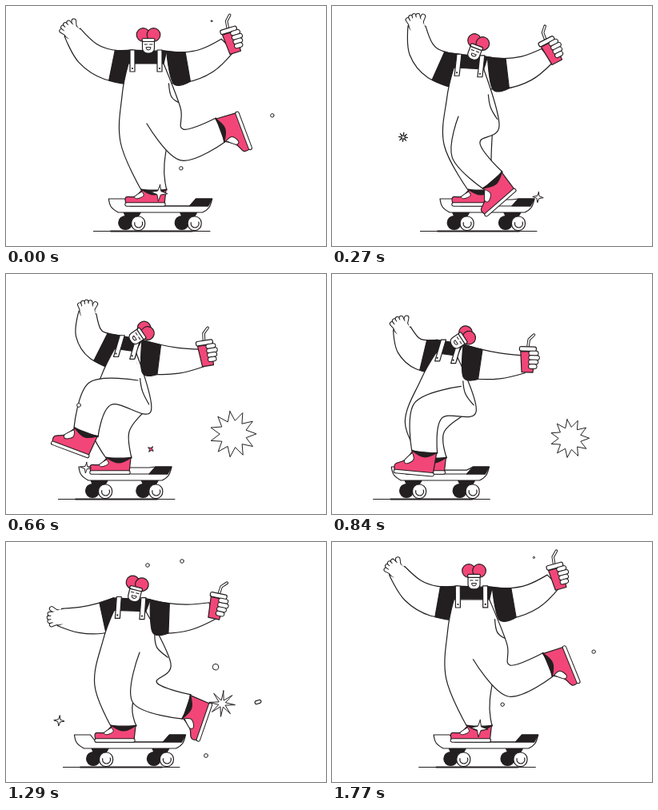
These frames come from a looping animation (400 by 300 pixels, 1.8 s). An HTML page with a canvas:

```html
<!DOCTYPE html>
<html lang="en">
<head>
<meta charset="utf-8">
<title>Skateboarder</title>
<style>
html, body { margin: 0; width: 100%; height: 100%; overflow: hidden; background: #fff; }
canvas { display: block; width: 400px; height: 300px; }
</style>
</head>
<body>
<canvas id="stage" width="400" height="300"></canvas>
<script>
const ctx = document.getElementById('stage').getContext('2d');
const LOOP = 1800, STEP = 30, INK = '#231f20', PINK = '#f24678', WHITE = '#fff';

// Key joints of the push cycle; everything else follows from them.
const keyTimes = [0, 270, 660, 1050, 1290, 1530];
const joints = {
  board: [193, 194, 149, 127, 155, 182],
  turn: [1, .85, .6, .65, .9, 1.03],
  lean: [-17, -27, -9, 13, 12, 4],
  neck: [[175, 72], [171, 78], [149, 95], [140, 103], [155, 86], [165, 75]],
  hip: [[176, 147], [158, 138], [165, 133], [157, 149], [167, 138], [173, 138]],
  seat: [[218, 127], [209, 150], [181, 172], [185, 168], [206, 152], [220, 138]],
  knee: [[220, 173], [168, 180], [118, 150], [135, 200], [174, 188], [212, 178]],
  ankle: [[268, 155], [201, 218], [100, 198], [157, 251], [226, 206], [261, 165]],
  wrist: [[83, 33], [106, 25], [102, 48], [69, 91], [67, 94], [68, 74]],
  cup: [[282, 43], [274, 56], [250, 99], [243, 108], [263, 80], [275, 51]]
};

const add = (a, x, y) => [a[0] + x, a[1] + y];
const mix = (a, b, u) => a.map((v, k) => v + (b[k] - v) * u);
const unit = v => { const d = Math.hypot(...v); return [v[0] / d, v[1] / d]; };
const toward = (a, b) => unit([b[0] - a[0], b[1] - a[1]]);
const along = (a, d, r) => add(a, d[0] * r, d[1] * r);
const spin = ([x, y], a) => [x * Math.cos(a) - y * Math.sin(a), x * Math.sin(a) + y * Math.cos(a)];
const clamp = (v, lo, hi) => Math.min(hi, Math.max(lo, v));

// Smooth periodic interpolation through the keys.
function track(keys, t) {
  const n = keyTimes.length;
  const time = i => keyTimes[(i + n) % n] + LOOP * Math.floor(i / n);
  const key = i => [].concat(keys[(i + n) % n]);
  let i = n - 1;
  while (keyTimes[i] > t) i--;
  const h = time(i + 1) - time(i), u = (t - time(i)) / h, end = key(i + 1);
  const slope = (j, k) => (key(j + 1)[k] - key(j - 1)[k]) / (time(j + 1) - time(j - 1)) * h * .8;
  const out = key(i).map((a, k) => a + (end[k] - a) * u * u * (3 - 2 * u)
    + slope(i, k) * u * (1 - u) ** 2 - slope(i + 1, k) * u * u * (1 - u));
  return out.length > 1 ? out : out[0];
}

function paint(fill, width = 1.2, stroke = INK) {
  if (fill) { ctx.fillStyle = fill; ctx.fill(); }
  if (width) { ctx.lineWidth = width; ctx.strokeStyle = stroke; ctx.stroke(); }
}

// kinds has one letter per point: c for a corner, s for a smooth point.
function shape(points, kinds, closed, fill, width) {
  const n = points.length, at = i => points[(i + n) % n];
  const tangent = i => kinds[i % n] === 's'
    ? [0, 1].map(k => (at(i + 1)[k] - at(i - 1)[k]) / 5.5) : [0, 0];
  ctx.beginPath();
  ctx.moveTo(...points[0]);
  for (let i = 0; i < n - (closed ? 0 : 1); i++) {
    const a = at(i), b = at(i + 1), p = tangent(i), q = tangent(i + 1);
    ctx.bezierCurveTo(a[0] + p[0], a[1] + p[1], b[0] - q[0], b[1] - q[1], ...b);
  }
  if (closed) ctx.closePath();
  paint(fill, width);
}
const poly = (points, fill, width) => shape(points, 'c'.repeat(points.length), true, fill, width);

function disc([x, y], r, fill, width) {
  ctx.beginPath();
  ctx.arc(x, y, r, 0, 7);
  paint(fill, width);
}
function pill(x, y, w, h, r, fill) {
  ctx.beginPath();
  ctx.roundRect(x, y, w, h, r);
  paint(fill);
}
function line(points, width, color) {
  ctx.beginPath();
  points.forEach(p => ctx.lineTo(...p));
  paint(null, width, color);
}
function tube(points, width) {
  line(points, width + 2, INK);
  line(points, width, WHITE);
}
function local([x, y], angle, draw) {
  ctx.save();
  ctx.translate(x, y);
  ctx.rotate(angle);
  draw();
  ctx.restore();
}

function drawBoard(x, t) {
  const half = 63.5 + 6.5 * Math.cos(2 * Math.PI * (t - 1400) / LOOP);
  const dip = clamp((half - 59) * 2, 1, 9), l = x - half, r = x + half;
  line([[x - 84, 281.5], [x + 62, 281.5]], 1);
  line([[x - 62, 281.5], [x + 40, 281.5]], 1.8);
  for (const w of [x - half * .43, x + half * .66]) {
    poly([[w - 18, 258], [w + 3, 258], [w - 2, 267], [w - 14, 267]], INK);
    disc([w - 16, 271], 8.5, INK);
    pill(w - 8.5, 263, 17, 17.5, 8, WHITE);
    ctx.beginPath();
    ctx.arc(w + .5, 272, 5, -.4, 3.4);
    paint();
  }
  shape([[l, 241], [l + 20, 241], [l + 27, 241 + dip], [r - 28, 241 + dip], [r - 20, 241], [r, 241],
    [r - 4, 252], [r - 12, 258], [l + 12, 258], [l + 3, 251]], 'ccccccsccs', true, WHITE);
  line([[l + 26, 250], [r - 5, 250]], 1);
  poly([[r - 28, 250], [r - 20, 241], [r, 241], [r - 5, 250]], INK);
}

// Draws in a frame whose y axis runs down the shin and x axis to the toe.
function atFoot(ankle, down, draw) {
  ctx.save();
  ctx.transform(-down[1], down[0], ...down, ...ankle);
  draw();
  ctx.restore();
}
function drawShoe(ankle, down, h) {
  atFoot(ankle, down, () => {
    const toe = [35, h - 9], vamp = [24, h * .45];
    shape([[35, h - 1], toe, vamp, [15, 0], [-15, 0], [-13, h]], 'cssccc', true, PINK);
    shape([[15, 2], vamp, [21, h * .6], [13, h * .4]], 'csss', true, WHITE, 1);
    tube([[34, h], [-12, h]], 3.4);
  });
}
function drawCuff(ankle, down) {
  atFoot(ankle, down, () => shape([[16, -1], [0, 6], [-16, -1], [0, 1]], 'cscs', true, INK));
}

// An arm is a tapering tube on a curve that sags more the higher the hand is.
function makeArm(shoulder, wrist, side) {
  const d = toward(shoulder, wrist), sag = 14 + .4 * Math.max(-10, shoulder[1] - wrist[1]);
  const elbow = along(mix(shoulder, wrist, .5), [-d[1] * side, d[0] * side], sag);
  const edge = (u, s) => {
    const a = mix(shoulder, elbow, u), b = mix(elbow, wrist, u), q = toward(a, b);
    return along(mix(a, b, u), [-q[1] * side, q[0] * side], s * (20 - 9 * u * u));
  };
  return { edge, wrist, heading: toward(elbow, wrist) };
}
function drawArm({ edge }) {
  const us = [0, .33, .67, 1];
  shape([...us.map(u => edge(u, -1)), ...us.reverse().map(u => edge(u, 1))], 'csscc' + 'ssc', false, WHITE);
}
function drawSleeve({ edge }, from, to, lobe) {
  shape([edge(from, -1), edge((from + to) / 2, -1), edge(to, -1), edge(to, 1), edge(lobe, 1)],
    'csccs', true, INK);
}

function drawHand({ wrist, heading }) {
  local(wrist, Math.atan2(heading[1], heading[0]) - .4, () => {
    disc([2, 0], 9.5, WHITE);
    tube([[2, 6], [8, 12]], 4.6);
    for (let i = 0; i < 4; i++) {
      const y = -7.5 + i * 4.6;
      tube([[4, y * .8], [14 - Math.abs(i - 1.5) * 1.6, y]], 4);
    }
    line([[-7, 0], [2, 0]], 18, WHITE);
  });
}

function drawHead(neck, turn) {
  const lean = Math.max(0, 1 - turn) * 140;
  local(add(neck, 3 + lean * .2, -22 + lean * .1), lean * Math.PI / 180, () => {
    pill(-7.5, -11, 15, 20, 6, WHITE);
    for (const s of [-1, 1]) disc([s * 6.5 * turn, -14], 8.3, PINK);
    pill(-8, -9.5, 16, 4, 2, WHITE);
    line([[-5, -2], [-1.5, -2]], 1);
    line([[1.5, -2], [5, -2]], 1);
    ctx.beginPath();
    ctx.arc(0, 2, 3, 0, Math.PI);
    ctx.closePath();
    paint(WHITE, 1);
  });
}

function drawCup(center, lean) {
  local(center, lean * Math.PI / 180, () => {
    tube([[0, -16], [1, -25], [7, -31]], 1.6);
    poly([[-9, -10], [9, -10], [7, 16], [-7, 16]], PINK);
    pill(-10.5, -16, 21, 5.5, 2, WHITE);
    for (let i = 0; i < 4; i++) {
      const y = -8 + i * 5.5;
      tube([[4, y], [12 - Math.abs(i - 1) * 1.5, y]], 4.6);
    }
  });
}

function drawRider(t) {
  const { board, turn, lean, neck, hip, seat, knee, ankle, wrist, cup } =
    Object.fromEntries(Object.entries(joints).map(([name, keys]) => [name, track(keys, t)]));
  const tilt = (1 - turn) * .35;
  const chest = (x, y) => add(neck, ...spin([x * turn, y], tilt));
  const bibL = chest(-22, 0), bibR = chest(22, 0);
  const farArm = makeArm(chest(-15, 3), wrist, -1);
  const cupArm = makeArm(chest(15, 3), add(cup, -5, 6), 1);

  drawBoard(board, t);
  drawArm(farArm);
  drawHand(farArm);
  drawSleeve(farArm, 0, .28, 0);
  drawArm(cupArm);
  poly([farArm.edge(0, -1), cupArm.edge(.08, -1), bibR, bibL], INK);

  // Standing leg and trunk.
  const foot = [board - 8, 230], floor = [0, 1];
  const bend = add(mix(neck, foot, .5), -40 - (neck[1] - 85) * .25, 20);
  drawShoe(foot, floor, 18);
  shape([bibL, add(mix(bibL, bend, .4), -4, 0), bend, add(foot, -16, 0), add(foot, 16, 0),
    add(foot, 13, -33), add(seat, -8, 0), bibR], 'cssccscc', true, WHITE);
  drawCuff(foot, floor);

  // Pushing leg; its foot flattens as it reaches the ground.
  const shin = toward(knee, ankle), flow = toward([0, 0], add(toward(hip, knee), ...shin));
  const out = [-flow[1], flow[0]];
  const down = unit(mix(shin, floor, clamp((ankle[1] - 225) / 25, 0, 1)));
  const across = [-down[1], down[0]];
  drawShoe(ankle, down, 27);
  shape([hip, along(knee, out, 20), along(ankle, across, 16), along(ankle, across, -16),
    along(knee, out, -19), seat, bibR], 'csccssc', false, WHITE);
  drawCuff(ankle, down);

  const pocket = add(mix(bibR, seat, .45), -3, 0);
  shape([pocket, add(pocket, 3, 16), mix(bibR, seat, .88)], 'csc', false);
  drawSleeve(cupArm, .08, .39, .2);
  for (const x of [-17, 17]) {
    const top = add(chest(x, -17), (1 - turn) * 10, 0), end = chest(x, 10);
    poly([add(top, -3, 0), add(top, 3, 0), add(end, 3, 0), add(end, -3, 0)], WHITE);
    disc(add(end, 0, -4), 1.1, INK, 0);
  }
  drawHead(neck, turn);
  drawCup(cup, lean);
}

const star = (points, inner, fill, turn) => (p, r) => {
  ctx.beginPath();
  for (let i = 0; i < points * 2; i++) {
    const [x, y] = along(p, spin([0, -1], turn + i * Math.PI / points), i % 2 ? r * inner : r);
    ctx.lineTo(x, y);
  }
  ctx.closePath();
  paint(fill, 1);
};
const dot = (p, r) => disc(p, r, WHITE, 1);
const dash = (p, r) => local(p, -.3, () => pill(-r, -r / 2, r * 2, r, r / 2, WHITE));
const twinkle = star(4, .3, WHITE, .1), flare = star(8, .27, WHITE, .1);

// Sparks: look, peak time, place, radius, drift per ms, rise and fade times.
const sparks = [
  [twinkle, 1770, [184, 233], 11, [.245, .02], 760, 480],
  [twinkle, 660, [100, 242], 7, [.2, 0], 120, 140],
  [star(4, .4, PINK, .6), 660, [181, 219], 4, [.15, 0], 100, 120],
  [flare, 270, [89, 164], 6, [.1, 0], 90, 90],
  [flare, 1050, [230, 184], 23, [.167, .075], 180, 490],
  [star(11, .58, WHITE, -.15), 660, [284, 200], 29, [.074, .03], 210, 600],
  [dot, 1050, [190, 173], 5, [.3, -.07], 90, 560],
  [dot, 1290, [177, 29], 2.3, [.157, -.02], 330, 620],
  [dot, 1290, [220, 24], 2.3, [.165, -.035], 330, 280],
  [dash, 1290, [315, 200], 4, [.11, -.03], 90, 200],
  [dash, 1530, [322, 93], 4, [.15, -.01], 90, 90]
];
for (const [time, x, y] of [[660, 91, 164], [1290, 250, 267], [1530, 335, 125],
  [1530, 341, 193], [1530, 218, 204], [1785, 216, 203], [1785, 330, 137]])
  sparks.push([dot, time, [x, y], 2.4, [.19, -.01], 100, 100]);

function drawSpark([look, peak, place, size, drift, rise, fade], t) {
  for (const age of [t - peak, t + LOOP - peak]) {
    const left = 1 - (age < 0 ? -age / rise : age / fade);
    if (left > 0) look(along(place, drift, age), size * Math.sqrt(left));
  }
}

function draw(t) {
  ctx.fillStyle = WHITE;
  ctx.fillRect(0, 0, 400, 300);
  ctx.lineJoin = 'round';
  ctx.lineCap = 'round';
  drawRider(t);
  sparks.forEach(s => drawSpark(s, t));
}
function frame(now) {
  draw(Math.floor(now % LOOP / STEP) * STEP);
  requestAnimationFrame(frame);
}
draw(0);
requestAnimationFrame(frame);
</script>
</body>
</html>
```
